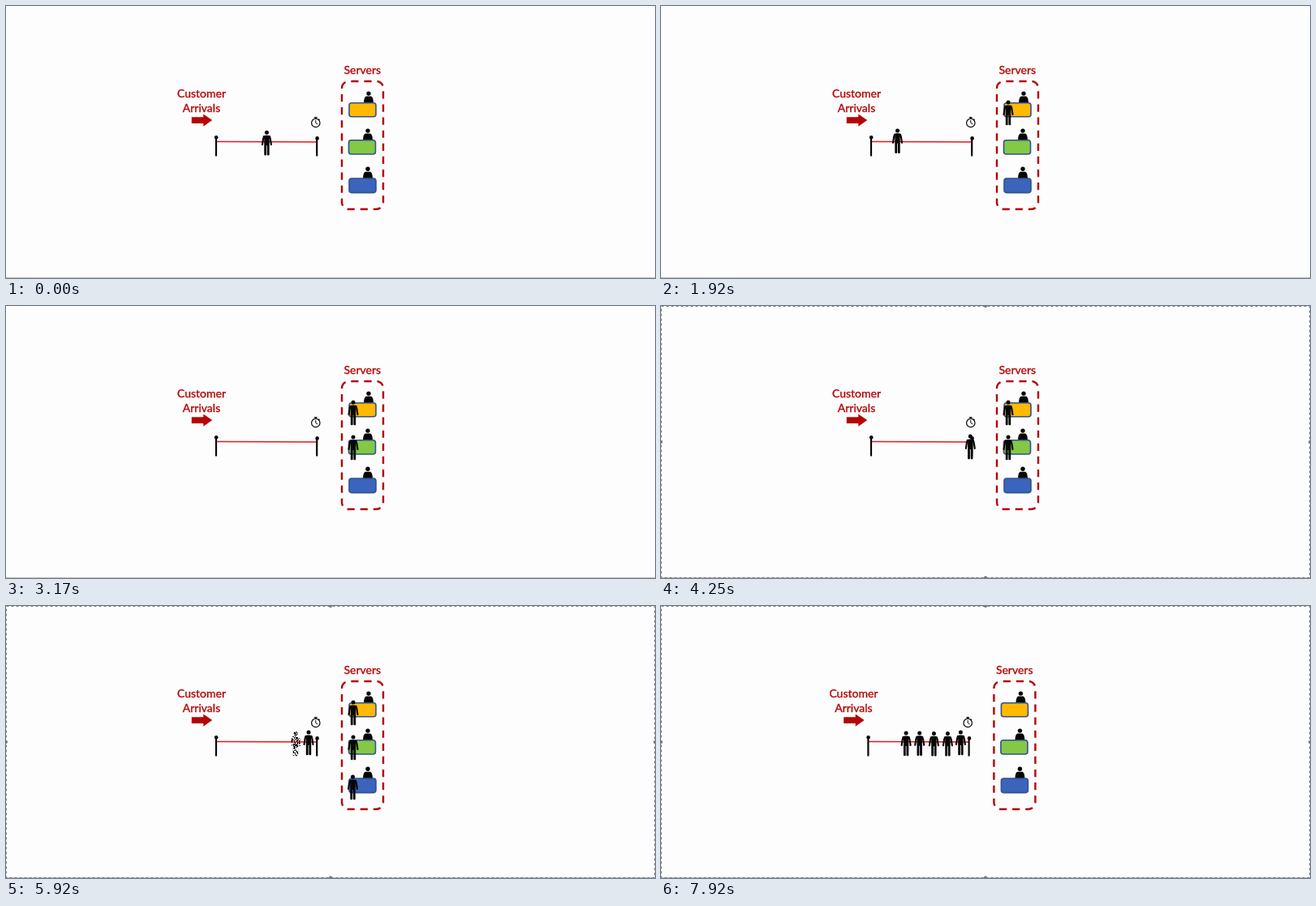
Recreate the animation shown at these times as an HTML page with a canvas. Size 800 by 336 pixels, loop 8 s.

```html
<!DOCTYPE html>
<html lang="en">
<head>
<meta charset="utf-8">
<title>Queue with three servers</title>
<style>
  html, body { margin: 0; width: 100%; height: 100%; overflow: hidden; background: #fdfdfd; }
  canvas { display: block; }
</style>
</head>
<body>
<canvas id="stage" width="800" height="336"></canvas>
<script>
const ctx = document.getElementById('stage').getContext('2d');
const LOOP = 8000, MOVE = 500, DISSOLVE = 500;
const BORDER_AT = 3790, CUT_AT = 7750, CUT_SHIFT = -3.6;
const RED = '#b40606', BLACK = '#060606';

const ENTRY = [227, 161.7], FRONT = [381.3, 174];
// Walks to the front of the line, then on to a free server.
const served = [
  { enter: -305, leave: 650, desk: [428, 132] },
  { enter: 1712, leave: 2550, desk: [428, 175] },
  { enter: 3318, leave: 4438, desk: [427.5, 224] }
];
const waiter = { enter: 4985, spot: [373, 169] };
const joiners = [
  { at: 5670, spot: [357, 170.3] },
  { at: 6170, spot: [340, 170.3] },
  { at: 6670, spot: [322.3, 169.8] },
  { at: 7170, spot: [305.7, 170] }
];
const desks = [
  { x: 423, y: 119.8, h: 17, fill: '#ffb900', head: 447 },
  { x: 422.5, y: 165.8, h: 17.2, fill: '#84c846', head: 446 },
  { x: 423, y: 213, h: 17.6, fill: '#3b64bd', head: 446 }
];

const clamp01 = v => Math.max(0, Math.min(1, v));
const mix = (a, b, p) => a.map((v, i) => v + (b[i] - v) * p);

function disc(x, y, r, color) {
  ctx.fillStyle = color;
  ctx.beginPath();
  ctx.arc(x, y, r, 0, Math.PI * 2);
  ctx.fill();
}

function line(color, width, ...points) {
  ctx.strokeStyle = color;
  ctx.lineWidth = width;
  ctx.beginPath();
  points.forEach(([x, y]) => ctx.lineTo(x, y));
  ctx.stroke();
}

// The thin outline gives the text a slightly heavier weight.
function label(text, x, y) {
  ctx.fillStyle = ctx.strokeStyle = RED;
  ctx.lineWidth = 0.35;
  ctx.font = '14px Lato, Carlito, sans-serif';
  ctx.textAlign = 'center';
  ctx.fillText(text, x, y);
  ctx.strokeText(text, x, y);
}

function person([x, y]) {
  ctx.save();
  ctx.translate(x, y);
  disc(0, -12.9, 2.5, BLACK);
  ctx.beginPath();
  ctx.roundRect(-4.4, -9.6, 8.8, 4, [3, 3, 0, 0]);
  ctx.rect(-3.2, -6, 6.4, 9);
  ctx.roundRect(-3.2, 2, 2.8, 13.2, [0, 0, 1, 1]);
  ctx.roundRect(0.4, 2, 2.8, 13.2, [0, 0, 1, 1]);
  ctx.fill();
  ctx.lineCap = 'round';
  for (const side of [-1, 1]) {
    line(BLACK, 2.1, [side * 3.5, -8.1], [side * 4.4, -5], [side * 5.5, 2]);
  }
  ctx.restore();
}

const hash = (i, j, seed) => {
  const v = Math.sin(i * 12.9898 + j * 78.233 + seed * 37.719) * 43758.5453;
  return v - Math.floor(v);
};

function dissolvePerson(spot, p, seed) {
  if (p <= 0) return;
  if (p >= 1) return person(spot);
  const left = Math.round(spot[0]) - 8, top = Math.round(spot[1]) - 17;
  ctx.save();
  ctx.beginPath();
  for (let i = 0; i < 16; i++) {
    for (let j = 0; j < 34; j++) {
      if (hash(i, j, seed) < p) ctx.rect(left + i, top + j, 1, 1);
    }
  }
  ctx.clip();
  person(spot);
  ctx.restore();
}

function drawDesk({ x, y, h, fill, head }) {
  disc(head, y - 11.7, 2.7, BLACK);
  ctx.beginPath();
  ctx.moveTo(head - 6, y);
  ctx.bezierCurveTo(head - 5.6, y - 6.5, head - 4.6, y - 8.2, head - 1.8, y - 8.2);
  ctx.lineTo(head + 1.8, y - 8.2);
  ctx.bezierCurveTo(head + 4.6, y - 8.2, head + 5.6, y - 6.5, head + 6, y);
  ctx.fill();
  ctx.beginPath();
  ctx.roundRect(x, y, 33, h, 3);
  ctx.fillStyle = fill;
  ctx.fill();
  ctx.strokeStyle = '#2f528f';
  ctx.lineWidth = 1.6;
  ctx.stroke();
}

function serverFrame() {
  const l = 414, t = 93, r = 465, b = 251, c = 8.5;
  ctx.save();
  ctx.strokeStyle = RED;
  ctx.lineWidth = 2.4;
  ctx.setLineDash([9.2, 6.9]);
  ctx.beginPath();
  ctx.moveTo(l, t + c);
  ctx.arcTo(l, t, r, t, c);
  ctx.arcTo(r, t, r, b, c);
  ctx.arcTo(r, b, l, b, c);
  ctx.arcTo(l, b, l, t, c);
  ctx.closePath();
  ctx.stroke();
  ctx.restore();
}

function arrow() {
  ctx.fillStyle = RED;
  ctx.beginPath();
  [[228.8, 137.2], [243.3, 137.2], [243.3, 133.4], [254.2, 141.1],
   [243.3, 148.8], [243.3, 145], [228.8, 145]].forEach(([x, y]) => ctx.lineTo(x, y));
  ctx.fill();
}

function stopwatch() {
  const x = 381.8, y = 144.4;
  ctx.strokeStyle = BLACK;
  ctx.lineWidth = 1.2;
  ctx.beginPath();
  ctx.arc(x, y, 5.2, 0, Math.PI * 2);
  ctx.stroke();
  line(BLACK, 1.3, [x - 1.8, 137.6], [x + 1.8, 137.6]);
  line(BLACK, 1.2, [x, 137.6], [x, 139.4]);
  line(BLACK, 1.2, [x + 3.6, 139.6], [x + 4.8, 140.8]);
  line(BLACK, 1, [x, y - 3.4], [x, y], [x + 2.4, y + 1.6]);
}

function rope() {
  line('#f0141c', 1.5, [259, 167.6], [383, 167.9]);
  line(BLACK, 2.2, [259, 162], [259, 185.5]);
  disc(259.2, 162.2, 2.3, BLACK);
  line(BLACK, 2.2, [383.2, 163], [383.2, 185.5]);
  disc(383.6, 163.4, 2.3, BLACK);
}

function selection() {
  ctx.save();
  ctx.setLineDash([3, 3]);
  ctx.strokeStyle = '#808080';
  ctx.lineWidth = 1;
  ctx.strokeRect(0.5, 0.5, 799, 335);
  ctx.restore();
  for (const [x, y] of [[400, 0], [400, 335.5], [0, 168], [800, 168]]) disc(x, y, 2, '#777');
}

function draw(t) {
  const cut = t >= CUT_AT;
  ctx.fillStyle = '#fdfdfd';
  ctx.fillRect(0, 0, 800, 336);
  line('#c4c4c4', 1, [0, 335.5], [800, 335.5]);
  if (t >= BORDER_AT) selection();

  ctx.save();
  if (cut) ctx.translate(CUT_SHIFT, 0);
  label('Customer', 241, 113);
  label('Arrivals', 241, 131);
  label('Servers', 439.3, 83.8);
  arrow();
  stopwatch();
  rope();
  serverFrame();
  desks.forEach(drawDesk);

  if (!cut) {
    for (const { enter, leave, desk } of served) {
      if (t < enter) continue;
      person(t < leave
        ? mix(ENTRY, FRONT, clamp01((t - enter) / MOVE))
        : mix(FRONT, desk, clamp01((t - leave) / MOVE)));
    }
  }
  if (t >= waiter.enter) {
    person(mix(ENTRY, waiter.spot, clamp01((t - waiter.enter) / MOVE)));
  }
  joiners.forEach(({ at, spot }, i) => dissolvePerson(spot, (t - at) / DISSOLVE, i + 1));
  ctx.restore();
}

const start = performance.now();
function tick() {
  draw((performance.now() - start) % LOOP);
  requestAnimationFrame(tick);
}
tick();
</script>
</body>
</html>
```
